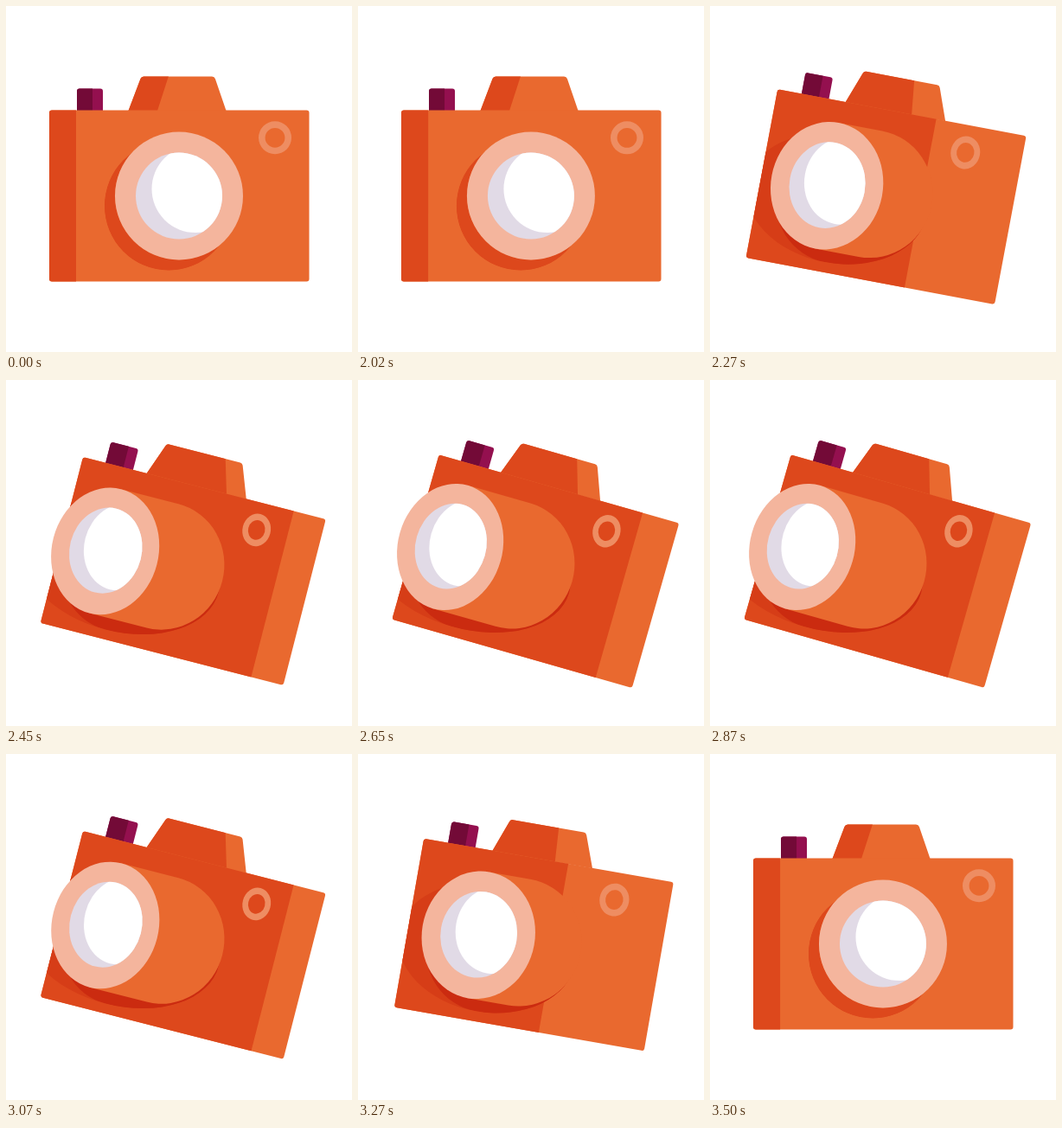
An HTML page with a canvas that plays this animation: 400x400 px, repeating every 3.52 s.

```html
<!DOCTYPE html>
<html lang="en">
<head>
<meta charset="utf-8">
<title>Camera</title>
<style>
  html, body { margin: 0; width: 100%; height: 100%; overflow: hidden; background: #fff; }
  canvas { display: block; width: 100vw; height: 100vh; }
</style>
</head>
<body>
<canvas id="stage"></canvas>
<script>
const LOOP = 3520, PEAK = 2760, HALF = 745;
const ORANGE = '#e9692f', DARK = '#dd481c';
const canvas = document.getElementById('stage');
const g = canvas.getContext('2d');

// Cubic bezier easing, solved by bisection
function bezier(x1, y1, x2, y2) {
  const at = (a, b, s) => 3 * a * s * (1 - s) ** 2 + 3 * b * s * s * (1 - s) + s ** 3;
  return x => {
    if (x <= 0) return 0;
    if (x >= 1) return 1;
    let lo = 0, hi = 1;
    for (let i = 0; i < 24; i++) {
      const mid = (lo + hi) / 2;
      if (at(x1, x2, mid) < x) lo = mid; else hi = mid;
    }
    return at(y1, y2, lo);
  };
}
const turnEase = bezier(.17, 0, .16, 1);
const smooth = bezier(.33, 0, .67, 1);
const mix = (a, b, k) => a + (b - a) * k;
const mixColor = (a, b, k) => `rgb(${a.map((v, i) => Math.round(mix(v, b[i], k)))})`;

function fill(path, color) {
  g.fillStyle = color;
  g.fill(path);
}
function oval(x, y, rx, ry = rx) {
  const p = new Path2D();
  p.ellipse(x, y, rx, ry, 0, 0, 7);
  return p;
}
function box(x, y, w, h, r = 0) {
  const p = new Path2D();
  p.roundRect(x, y, w, h, r);
  return p;
}
function poly(...pts) {
  const p = new Path2D();
  pts.forEach(([x, y]) => p.lineTo(x, y));
  p.closePath();
  return p;
}
function clipped(path, draw) {
  g.save();
  g.clip(path);
  draw();
  g.restore();
}

function drawButton(p) {
  const left = -118 - 4.5 * p;
  fill(box(left, -123.5, -88 - left, 26, [3, 3, 0, 0]), '#94104f');
  fill(box(left, -123.5, -100 - left, 26, [3, 0, 0, 0]), '#730a37');
}

function drawPrism(p, rise, settle) {
  const shape = new Path2D();
  shape.moveTo(-58.5 - 14.5 * p, -98);
  shape.arcTo(-43.5 - 14.5 * p, -137.5, 41 - 4.5 * p, -137.5, 4);
  shape.arcTo(41 - 4.5 * p, -137.5, 54.5 - 2.5 * p, -98, 4);
  shape.lineTo(54.5 - 2.5 * p, -98);
  shape.closePath();
  fill(shape, ORANGE);
  const top = -12 + 28 * rise - 6.5 * settle;
  const base = -25 + 53 * rise - 5.5 * settle;
  clipped(shape, () => fill(poly([-200, -140], [top, -138], [base, -98], [-200, -98]), DARK));
}

function drawBody(p, rise, settle) {
  const shape = box(-150, -98.5, 300.5, 198, 3);
  fill(shape, ORANGE);
  clipped(shape, () => {
    fill(box(-160, -110, 41 + 230 * rise - 8 * settle, 220), DARK);

    // Lens shadow, with a deeper core under the barrel
    const k = Math.min(1, p / .6), x = -12 - 68 * p, y = 12 + 2 * p;
    const shadow = oval(x, y, 74 + 52 * p, 74.5);
    fill(shadow, mixColor([221, 72, 28], [214, 61, 23], k));
    clipped(shadow, () => {
      const core = oval(x, y, 74 - 2 * p, 74.5);
      core.rect(x, y - 74.5, 160, 149);
      fill(core, mixColor([221, 72, 28], [203, 43, 16], k));
    });
  });
}

function drawRing(p) {
  const s = 1 - .125 * p;
  const ring = oval(111 - 42.2 * p, -66.7, 19 * s, 19);
  ring.addPath(oval(111 - 42.2 * p, -66.7, 11.4 * s, 11.4));
  g.fillStyle = '#ee8d62';
  g.fill(ring, 'evenodd');
}

function drawLens(p) {
  const front = -107.7 * p, back = -28.3 * p, s = 1 - .151 * p;
  const barrel = oval(back, .5, 74);
  barrel.rect(front, -73.5, back - front, 148);
  fill(barrel, ORANGE);

  g.save();
  g.translate(front, .5);
  g.scale(s, 1);
  fill(oval(0, 0, 74), '#f4b59d');
  const glass = oval(.5 * p, -p, 50);
  fill(glass, '#e1dae6');
  clipped(glass, () => fill(oval(19 + .5 * p, -8 - p, 50.5), '#fff'));
  g.restore();
}

function draw(t) {
  const x = Math.max(0, 1 - Math.abs(t - PEAK) / HALF);
  const p = turnEase(x);
  const rise = smooth(x / .54);
  const settle = smooth((x - .54) / .46);

  g.setTransform(canvas.width / 400, 0, 0, canvas.height / 400, 0, 0);
  g.fillStyle = '#fff';
  g.fillRect(0, 0, 400, 400);
  g.translate(200 + 5.2 * p, 219 + 1.6 * p);
  g.rotate(16.1 * p * Math.PI / 180);
  g.scale(1 - .04 * p, 1);
  drawButton(p);
  drawPrism(p, rise, settle);
  drawBody(p, rise, settle);
  drawRing(p);
  drawLens(p);
}

function resize() {
  const dpr = window.devicePixelRatio || 1;
  canvas.width = Math.round(innerWidth * dpr);
  canvas.height = Math.round(innerHeight * dpr);
}
addEventListener('resize', resize);
resize();

const start = performance.now();
function tick() {
  draw((performance.now() - start) % LOOP);
  requestAnimationFrame(tick);
}
tick();
</script>
</body>
</html>
```
